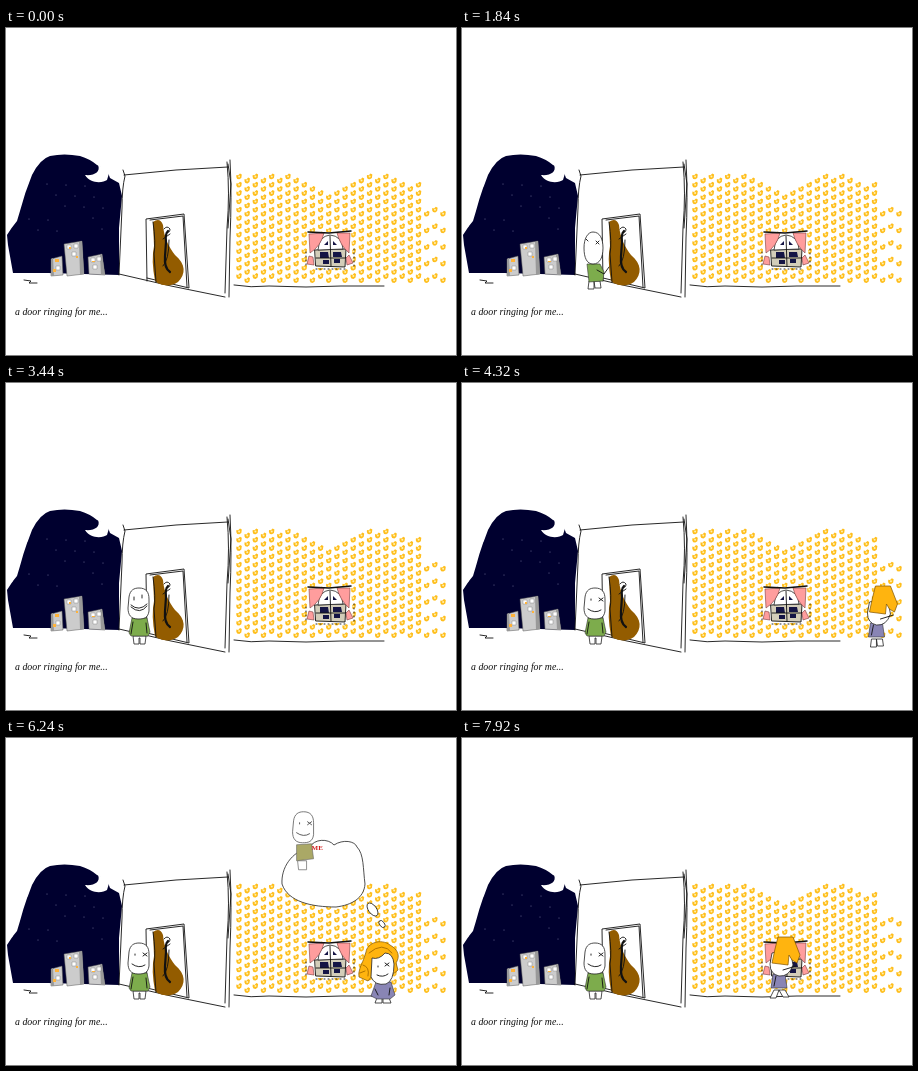
These frames come from a looping animation (450 px wide and 327 px high, 8000 ms). An HTML page:

```html
<!DOCTYPE html>
<html lang="en">
<head>
<meta charset="utf-8">
<title>A door ringing</title>
<style>
  html, body { margin: 0; width: 100%; height: 100%; overflow: hidden; background: #fff; }
  svg { display: block; width: 100%; height: 100%; }
  .ink { fill: none; stroke: #111; stroke-width: .9; stroke-linecap: round; stroke-linejoin: round; }
  .skin { fill: #fff; stroke: #222; stroke-width: .8; stroke-linejoin: round; }
  .shirt { fill: #7dac4c; stroke: #333; stroke-width: .6; }
  .hair { fill: #ffb40f; stroke: #7d5200; stroke-width: .7; }
  .dress { fill: #8985b5; stroke: #333; stroke-width: .6; }
  text { font-style: italic; font-family: "Liberation Serif", serif; }
  .ink, .skin, .shirt, .hair, .dress { vector-effect: non-scaling-stroke; }
</style>
</head>
<body>
<svg viewBox="0 0 450 327" preserveAspectRatio="none">
  <defs>
    <g id="flower">
      <path d="M-2.6-1.6L-.8-1.2L1-3L2.8-2L2.3 1.4L.3 2.8L-1.8 2.4L-2.7.6Z" fill="#ffbe1c"/>
      <circle cx=".1" cy="0" r="1" fill="#fff0b0"/>
    </g>
    <path id="manHead" class="skin" d="M-10-48C-9-55-5-57 0-57C7-57 10-53 10-46L10-34C9-27 5-26-1-26C-8-26-11-30-11-37Z"/>
    <path id="face" class="ink" d="M-4-46v1.2M4-47l4 3M8-47l-4 3M-7-36Q0-31 6-35"/>
    <path id="grin" class="ink" d="M-5-48v3M3-50v3M-8-40Q0-33 8-41M-8-38Q1-30 8-39"/>
  </defs>

  <!-- Night town -->
  <path fill="#00002f" d="M7 245L2 217L1 207Q6 199 11 193L14 183Q19 164 26 147Q34 131 44 128Q58 125 74 128Q84 131 91 137L101 142L104 150L113 155L116 168L113 200V247L42 245Z"/>
  <path fill="#fff" d="M79 147C84 156 97 155 101 152L104 142L92 137C95 144 88 148 79 147Z"/>
  <g id="stars" fill="#d8d8ff"></g>
  <g stroke="#555" stroke-width=".5">
    <path fill="#ccc" d="M45 231L56 228L57 247L45 248ZM58 216L76 213L78 246L61 248ZM82 229L96 226L99 247L83 246Z"/>
    <path fill="#999" stroke="none" d="M45 231l2-1l1 18h-3ZM73 214l3-1l2 33l-4 1ZM94 227l2-1l3 21h-4Z"/>
    <path fill="#fff" stroke="#888" d="M61 217h4v4h-4ZM68 216h4v4h-4ZM66 224h4v4h-4ZM50 238h4v4h-4ZM85 230h4v4h-4ZM91 229h4v4h-4ZM87 237h4v4h-4Z"/>
    <path fill="#ffb33a" stroke="none" d="M49 231h4v3h-4ZM63 219h2v2h-2ZM70 228h2v2h-2ZM86 233h3v1h-3ZM47 241h3v3h-3Z"/>
  </g>
  <path class="ink" d="M18 252L25 253L23 255L31 255"/>

  <!-- Room and door -->
  <path class="ink" d="M117 142L119 148Q116 160 116 180L113 247M118 147L170 142L222 139M113 246L165 258L219 269"/>
  <path class="ink" stroke-width="1.1" d="M221 134Q224 165 221 200L219 265M224 132Q226 168 224 210L223 269M222 136L225 156L222 200"/>
  <path class="ink" d="M141 253L140 191L178 186L183 260L141 250M144 192L177 188L181 259"/>
  <path fill="#935c00" d="M147 194Q154 189 157 197C158 210 163 219 169 227C180 236 180 246 172 254C164 260 153 257 149 253Q145 232 148 218Z"/>
  <path class="ink" d="M147 194Q150 215 148 226L150 254"/>
  <path class="ink" style="stroke-width:2.2" d="M162 203Q159 206 160 214L159 228Q158 240 164 244"/>
  <path class="ink" d="M158 201q3-4 6 0q0 4-4 4M157 211L164 206M157 238Q163 232 163 212"/>

  <!-- Wallpapered room -->
  <g id="wallpaper"></g>
  <path class="ink" d="M228 257Q245 260 263 258L300 259L335 258L378 258"/>
  <path fill="#fff" d="M302 204H345L347 237L338 240H308L301 237Z"/>
  <path class="ink" style="fill:#d3cdb9" d="M309 222L340 221L339 239L310 238Z"/>
  <path class="skin" d="M312 222Q313 208 324 207Q336 208 337 221Z"/>
  <path fill="#151545" d="M314 224h8l1 6h-9ZM327 224h8l1 5h-9ZM317 232h6v4h-6ZM328 231h6v4h-6ZM318 217l4-4v4ZM327 213l4 4h-4Z"/>
  <path class="ink" d="M324 208L325 238M310 230H340"/>
  <path fill="#ff9d9d" stroke="#7b3b3b" stroke-width=".6" d="M303 206L318 205Q315 218 304 225ZM331 205L344 205L343 225Q334 217 331 205ZM303 228l4 1l1 8l-7-1ZM343 227l4 8l-6 2l-1-7Z"/>
  <path class="ink" style="stroke-width:1.5" d="M302 204L323 205L345 203"/>
  <path class="ink" stroke-dasharray="1 3" d="M300 224V239M348 221V240M310 241H340"/>

  <text x="9" y="287" font-size="9.85" fill="#111">a door ringing for me...</text>

  <g id="ring" class="ink"></g>

  <!-- Visitor -->
  <g id="man">
    <g id="manWalk">
      <path id="manFeet" class="skin"/>
      <path class="shirt" d="M-8-26L5-26L9-18L8-9L-6-8Z"/>
      <path id="manArm" class="ink"/>
      <g id="manTilt">
        <path class="skin" d="M-11-42C-11-52-7-58-2-58C5-58 8-51 8-42C8-33 5-26-2-26C-8-26-11-32-11-42Z"/>
        <path class="ink" d="M1-49l3 3M4-49l-3 3M-9-51l2 2"/>
      </g>
    </g>
    <g id="manFront">
      <path class="skin" d="M-6-9L-5-1H0V-7H1V-1H6L7-9Z"/>
      <path class="shirt" d="M-7-27L8-27L11-13L9-9L-8-9L-10-12Z"/>
      <path class="ink" d="M-6-23L-8-11M7-22L8-12"/>
      <use href="#manHead"/>
      <use id="manFace" href="#face"/><use id="manGrin" href="#grin"/>
    </g>
  </g>

  <!-- Thought -->
  <g class="skin">
    <ellipse id="puff1" cx="376" cy="186" rx="2.4" ry="4" transform="rotate(-38 376 186)"/>
    <ellipse id="puff2" cx="366.5" cy="171.5" rx="4" ry="7.5" transform="rotate(-36 366.5 171.5)"/>
    <path id="cloud" d="M276 146C275 130 285 114 304 109C308 101 322 100 328 107C337 101 349 103 351 109C358 116 357 131 359 146C358 160 346 167 330 169C306 169 282 164 276 146Z"/>
  </g>
  <g id="dream">
    <path class="skin" style="stroke:#777" d="M-6-9L-5 0H3V-9Z"/>
    <path d="M-7-25L8-26L10-11L-7-9Z" fill="#aaa866" stroke="#666" stroke-width=".6"/>
    <g opacity=".75" transform="translate(0 -1)"><use href="#manHead"/><use href="#face"/></g>
    <text x="8" y="-20" font-size="7" fill="#d32020" style="font-style:normal;font-weight:bold">ME</text>
  </g>

  <!-- Host -->
  <g id="woman">
    <g id="womanWalk">
      <path id="womanFeet" class="skin"/>
      <path class="dress" d="M-12-25L0-25L2-11L-14-11Z"/>
      <path class="skin" d="M-13-46L5-50L8-34Q4-22-6-23Q-15-25-15-35Z"/>
      <path class="hair" d="M-7-62L8-62L15-44L12-36L7-39L4-44L3-34L-13-36L-10-50Z"/>
      <path class="ink" d="M-2-29L11-33M-9-23L-11-13"/>
    </g>
    <g id="womanFront">
      <path class="hair" d="M-15-51C-14-60 0-65 9-58C18-53 19-46 15-40L17-33L10-27L-9-27L-13-22L-22-26C-23-34-18-41-17-45Z"/>
      <path class="ink" style="stroke:#a66b00" d="M-12-50Q2-62 11-50M-18-38Q-11-36-13-27M-21-30l5-2"/>
      <path class="skin" d="M-3-8L-6 0H1V-6H2V0H10L7-8Z"/>
      <path class="dress" d="M-5-21L10-21L14-8L9-4L-4-4L-10-7Z"/>
      <path class="skin" d="M-9-45Q-2-43 4-50Q12-50 13-39Q13-22 5-19Q-6-17-10-26Z"/>
      <path class="ink" d="M-3-37v1M4-40l4 3M8-40l-4 3M-4-28Q2-25 7-29M-6-14L-3-8M9-15L8-8"/>
    </g>
  </g>
</svg>

<script>
  const LOOP = 8000, STEP = 80;
  const el = id => document.getElementById(id);
  const show = (id, on) => { el(id).style.display = on ? "" : "none"; };
  const place = (id, x, y, size = 1) =>
    el(id).setAttribute("transform", `translate(${x} ${y}) scale(${size})`);

  // Linear interpolation through [position, value] points.
  function along(p, points) {
    if (p <= points[0][0]) return points[0][1];
    for (let i = 1; i < points.length; i++) {
      const [a, va] = points[i - 1], [b, vb] = points[i];
      if (p <= b) return va + (vb - va) * (p - a) / (b - a);
    }
    return points[points.length - 1][1];
  }

  // Columns of flowers, every second one half a row lower, thinning out at the right.
  function buildWallpaper() {
    const edge = [[231, 145], [282, 144], [298, 154], [315, 164], [331, 164], [347, 154],
                  [363, 144], [380, 144], [396, 152], [412, 154], [422, 175], [440, 180]];
    let out = "";
    for (let col = 0; col < 26; col++) {
      const x = 233 + col * 8.16, gap = col < 23 ? 8.3 : 16.6;
      for (let y = 148.5 + col % 2 * 4.1; y < 256; y += gap)
        if (y > along(x, edge)) out += `<use href="#flower" x="${x}" y="${y}"/>`;
    }
    el("wallpaper").innerHTML = out;
  }

  function buildStars() {
    let out = "";
    for (let i = 0; i < 16; i++)
      out += `<circle cx="${22 + i * 37 % 83}" cy="${155 + i * 23 % 57}" r=".4"/>`;
    el("stars").innerHTML = out;
  }

  const feet = (swing, x) =>
    `M${x - 5}-9L${x - 6 - swing}-1H${x - swing}L${x}-9ZM${x}-9L${x + 1 + swing}-2H${x + 7 + swing}L${x + 6}-9Z`;

  function drawMan(t, beat) {
    show("man", t >= 400);
    show("manWalk", t < 3440);
    show("manFront", t >= 3440);
    show("manGrin", t < 4240);
    show("manFace", t >= 4240);
    const x = along(t, [[400, 14], [720, 51], [1200, 96], [1840, 133]]);
    const size = along(t, [[400, 1.8], [720, 1.59], [1200, 1.34], [1840, 1]]);
    place("man", x, along(t, [[400, 265], [720, 262]]), size);
    const atDoor = t >= 1760;
    el("manFeet").setAttribute("d", feet(!atDoor && beat % 2 ? 3 : 0, -1));
    const tilt = along(t, [[1200, -15], [1760, 0]]);
    el("manTilt").setAttribute("transform", `rotate(${tilt} 2 -26)`);
    const reach = t >= 2160 && beat % 4 < 2 ? 18 : 14;
    el("manArm").setAttribute("d", atDoor ? `M2-20L9-16L${reach}-${reach + 9}` : "M-4-22L-5-11M4-20L6-12");
  }

  function drawRing(t, beat) {
    const on = t >= 2160 && t < 3440;
    show("ring", on);
    if (!on) return;
    const r = 12 + beat % 5 * 9, d = r * .7;
    el("ring").innerHTML = `<path d="M${160 - d} ${202 - d}A${r} ${r} 0 0 1 ${160 + d} ${202 - d}"/>`;
  }

  function drawThought(t) {
    const starts = { puff1: 5200, puff2: 5360, cloud: 5520, dream: 5760 };
    for (const id in starts) show(id, t >= starts[id] && t < 7280);
    const p = along(t, [[5760, 0], [6400, 1]]);
    const ease = 1 - (1 - p) ** 2;
    place("dream", 336 - 41 * ease, 143 - 12 * ease);
  }

  function drawWoman(t, beat) {
    const standing = t >= 4960 && t < 7440;
    show("woman", t >= 3840);
    show("womanWalk", !standing);
    show("womanFront", standing);
    place("woman", along(t, [[3840, 475], [4720, 375], [7440, 375], [7920, 323]]),
      along(t, [[7440, 265], [7920, 261]]));
    const moving = t < 4720 || t >= 7440;
    el("womanFeet").setAttribute("d", feet(moving && beat % 2 ? 3 : 0, -6));
  }

  const start = performance.now();

  function draw(now) {
    const beat = Math.floor(Math.max(0, now - start) % LOOP / STEP), t = beat * STEP;
    drawMan(t, beat);
    drawRing(t, beat);
    drawThought(t);
    drawWoman(t, beat);
    requestAnimationFrame(draw);
  }

  buildWallpaper();
  buildStars();
  draw(start);
</script>
</body>
</html>
```
